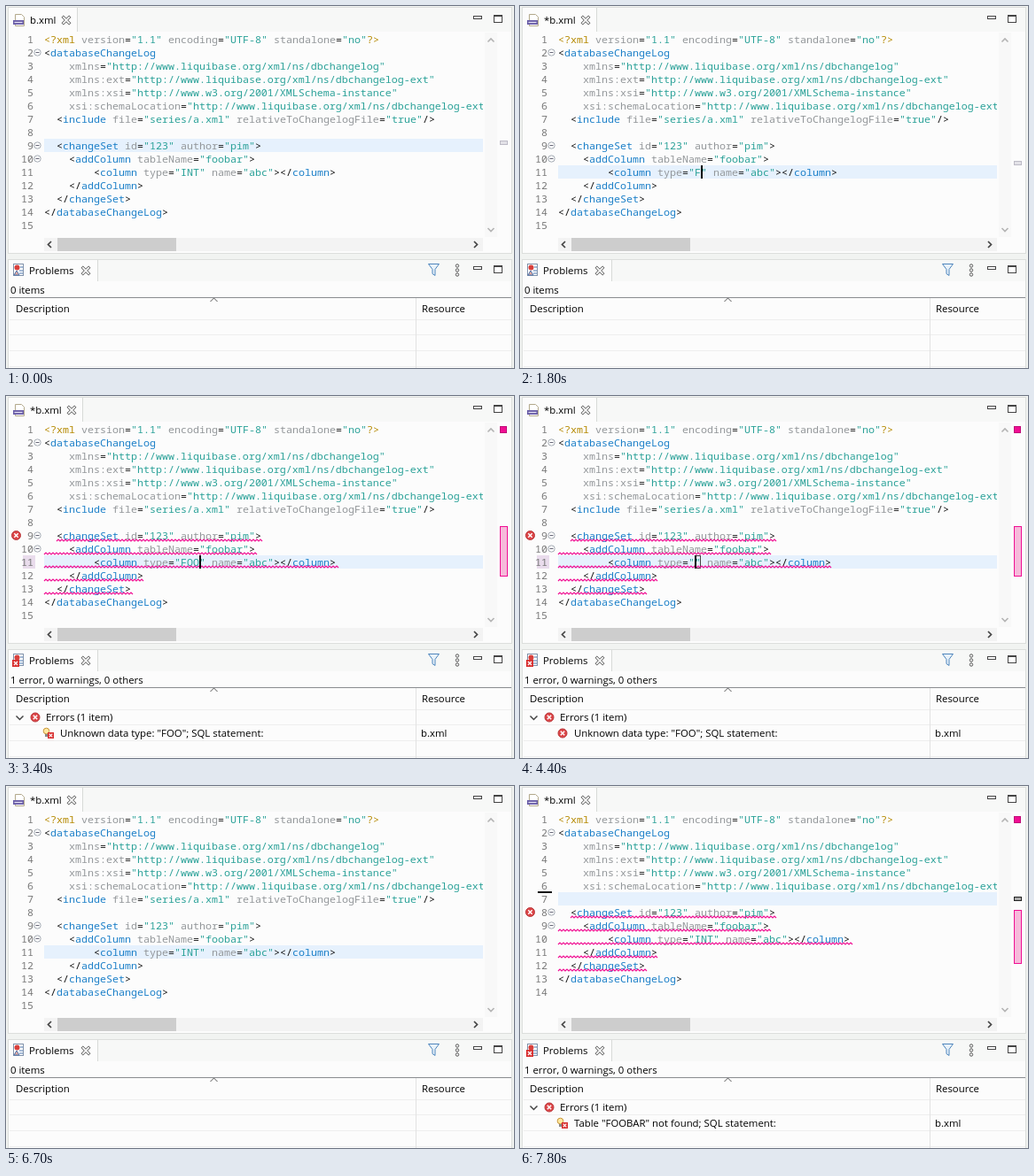
An HTML page that plays this animation: 573 by 409 pixels, repeating every 8 s.

```html
<!DOCTYPE html>
<html lang="en">
<head>
<meta charset="utf-8">
<title>XML changelog editor</title>
<style>
  html, body { margin: 0; width: 100%; height: 100%; overflow: hidden; }
  svg { display: block; width: 573px; height: 409px; }
  text { white-space: pre; }
  .code { font: 11.667px "Noto Sans Mono", monospace; }
  .ui { font: 11.4px "Open Sans", sans-serif; fill: #000; }
</style>
</head>
<body>
<svg id="stage" viewBox="0 0 573 409"></svg>
<script>
const LOOP = 8000, LEFT = 43, TOP = 30, CHAR = 7, ROW = 15, BASELINE = 12, VALUE_COL = 22;
const PINK = '#f00e93';

// Each step changes part of the editor state at a given time.
const steps = [
  [0, { line: 9, col: 0, caret: false, value: 'INT', selected: false, dirty: false,
        removed: false, invalid: false, problem: '', quickFix: false, ruler: 152 }],
  [500, { line: 11, col: 24, caret: true }],
  [700, { col: 25, selected: true }],
  [1200, { caret: false }],
  [1600, { caret: true }],
  [1800, { value: 'F', col: 23, selected: false, dirty: true, ruler: 175 }],
  [1900, { invalid: true, ruler: 0 }],
  [2000, { value: 'FO', col: 24 }],
  [2200, { value: 'FOO', col: 25 }],
  [2400, { problem: 'Unknown data type: "FOO"; SQL statement:' }],
  [2500, { quickFix: true }],
  [2900, { caret: false }],
  [3400, { caret: true }],
  [3500, { quickFix: false }],
  [3900, { caret: false }],
  [4400, { value: '', col: 22, caret: true }],
  [4900, { problem: 'Unknown data type: ; SQL statement:', quickFix: true }],
  [5000, { value: 'I', col: 23 }],
  [5100, { value: 'IN', col: 24 }],
  [5200, { value: 'INT', col: 25, invalid: false }],
  [5700, { caret: false }],
  [6100, { problem: '', quickFix: false }],
  [6200, { caret: true }],
  [6700, { caret: false }],
  [6800, { line: 7, col: 0, caret: true }],
  [7200, { removed: true, ruler: 125 }],
  [7300, { invalid: true }],
  [7700, { caret: false, problem: 'Table "FOOBAR" not found; SQL statement:' }],
  [7800, { quickFix: true }],
];

const rect = (x, y, w, h, fill, stroke = 'none') =>
  `<rect x="${x}" y="${y}" width="${w}" height="${h}" fill="${fill}" stroke="${stroke}"/>`;
const path = (d, stroke, width = 1, fill = 'none') =>
  `<path d="${d}" stroke="${stroke}" stroke-width="${width}" fill="${fill}"/>`;
const circle = (x, y, r, fill, stroke = 'none') =>
  `<circle cx="${x}" cy="${y}" r="${r}" fill="${fill}" stroke="${stroke}"/>`;
const escapeText = s => s.replace(/&/g, '&amp;').replace(/</g, '&lt;');
const label = (x, y, s) => `<text class="ui" x="${x}" y="${y}">${escapeText(s)}</text>`;
const rowTop = line => TOP + (line - 1) * ROW;
const codeText = (x, line, s, fill) =>
  `<text class="code" x="${x}" y="${rowTop(line) + BASELINE}" fill="${fill}">${escapeText(s)}</text>`;
const cross = (x, y, r, stroke, width) =>
  path(`M${x - r} ${y - r}l${2 * r} ${2 * r}m0 ${-2 * r}l${-2 * r} ${2 * r}`, stroke, width);
const errorIcon = (x, y) => circle(x, y, 5, '#dc4446', '#b9393c') + cross(x, y, 2.2, '#fff', 1.5);
const closeButton = (x, y) => cross(x, y, 4.3, '#555', 3.2) + cross(x, y, 3.8, '#fcfcfc', 1.7);

function windowButtons(y) {
  return rect(527.5, y - 2.5, 9, 3, '#fff', '#444') + rect(550.5, y - 3.5, 9, 8, '#fff', '#444') +
    path(`M550 ${y - 2.5}h10`, '#444');
}

function changelog({ value, removed }) {
  const site = 'http://www.liquibase.org/xml/ns/dbchangelog';
  const lines = [
    '<?xml version="1.1" encoding="UTF-8" standalone="no"?>',
    '<databaseChangeLog',
    `    xmlns="${site}"`,
    `    xmlns:ext="${site}-ext"`,
    '    xmlns:xsi="http://www.w3.org/2001/XMLSchema-instance"',
    `    xsi:schemaLocation="${site}-ext`,
    '  <include file="series/a.xml" relativeToChangelogFile="true"/>',
    '',
    '  <changeSet id="123" author="pim">',
    '    <addColumn tableName="foobar">',
    `        <column type="${value}" name="abc"></column>`,
    '    </addColumn>',
    '  </changeSet>',
    '</databaseChangeLog>',
    '',
  ];
  if (removed) lines.splice(6, 1);
  return lines;
}

function tokenColor(token, before) {
  if (token[0] === '"') return '#2aa198';
  if (/\?/.test(token)) return '#b58900';
  if (!/\w/.test(token)) return '#111';
  return /[<\/]$/.test(before) ? '#1b7fc8' : '#93979a';
}

function codeLine(source, line) {
  const tokens = source.matchAll(/"[^"]*"?|<\?xml|\?>|<\/?|[\w:]+|[^"\w<?\s]+/g);
  return [...tokens].map(t => codeText(LEFT + t.index * CHAR, line, t[0],
    tokenColor(t[0], source.slice(0, t.index)))).join('');
}

function squiggle(from, to, y) {
  let d = `M${from} ${y}`;
  for (let x = from; x < to; x += 4) d += 'l2 -2l2 2';
  return path(d, PINK, 1.2);
}

function editor(s) {
  const lines = changelog(s);
  const first = s.removed ? 8 : 9;
  let out = rect(2.5, 1.5, 568, 278, '#fcfcfc', '#dcdedc') + rect(3, 2, 567, 27, '#f7f8f7');

  // Tab
  const tabEnd = s.dirty ? 86.5 : 80.5;
  out += rect(3, 2, tabEnd - 3, 28, '#fcfcfc') + path(`M${tabEnd} 2v27`, '#d8dad8') +
    path('M10.5 9.5h7l3 3v10h-10z', '#b3a98c', 1, '#fff') + rect(8, 16, 12, 5, '#6b5fa8') +
    path('M9.5 18.5h9', '#e4e0f4', 1.2) +
    label(27, 20, s.dirty ? '*b.xml' : 'b.xml') + closeButton(s.dirty ? 74 : 68, 16) +
    windowButtons(14);

  // Scroll bars
  out += rect(540, 30, 14, 231, '#f8f8f8') +
    path('M543.5 40.5l3.5 -3.5l3.5 3.5M543.5 251l3.5 3.5l3.5 -3.5', '#b4b4b4', 1.6) +
    rect(43, 262, 495, 15, '#f3f3f3') + rect(58, 262, 134, 15, '#cdcdcd') +
    path('M51 266l-3.5 3.5l3.5 3.5M528 266l3.5 3.5l-3.5 3.5', '#444', 1.7);

  // Current line and line numbers
  out += rect(LEFT, rowTop(s.line), 495, ROW, '#e6f1fd');
  if (s.invalid && s.value !== 'INT') out += rect(19, rowTop(11), 14, ROW, '#e9dcec');
  lines.forEach((_, i) => {
    const number = String(i + 1);
    out += codeText(31 - number.length * CHAR, i + 1, number, '#787878');
  });
  if (s.removed) out += rect(20, 119, 16, 2, '#111');
  for (const line of [2, first, first + 1]) {
    const y = rowTop(line) + 7.5;
    out += circle(35.5, y, 3.7, '#fff', '#a3aab2') + path(`M33.5 ${y}h4`, '#667');
  }

  // Code
  const valueX = LEFT + VALUE_COL * CHAR;
  if (s.selected) out += rect(valueX, rowTop(11), 3 * CHAR, ROW, '#0078d7');
  out += '<g clip-path="url(#codeArea)">' + lines.map((t, i) => codeLine(t, i + 1)).join('') + '</g>';
  if (s.selected) out += codeText(valueX, 11, s.value, '#fff');
  if (!s.value) out += rect(valueX + .5, rowTop(11) + .5, 6, ROW - 1, 'none', '#444');

  // Error markers
  if (s.invalid) {
    for (let line = first; line < first + 5; line++) {
      out += squiggle(line === first ? LEFT + 2 * CHAR : LEFT,
        LEFT + lines[line - 1].length * CHAR, rowTop(line) + 14);
    }
    out += errorIcon(11.5, rowTop(first) + 7.5) + rect(557.5, 34.5, 7, 7, PINK, '#c00c78') +
      rect(557.5, s.removed ? 140.5 : 147.5, 8, s.removed ? 60 : 56, '#f6b9da', PINK);
  }
  if (s.ruler) {
    out += rect(557.5, s.ruler + .5, 8, 4, s.removed ? '#aaa' : '#e2e1e7', s.removed ? '#222' : '#bdbbc6');
  }
  if (s.caret) out += rect(LEFT + s.col * CHAR, rowTop(s.line), 2, ROW, '#000');
  return out;
}

function problems(s) {
  let out = rect(2.5, 286.5, 568, 125, '#fcfcfc', '#dcdedc') + rect(3, 287, 567, 24, '#f7f8f7') +
    rect(3, 287, 100, 26, '#fcfcfc') + path('M103.5 287v24', '#d8dad8');

  // View icon and toolbar
  out += rect(8.5, 291.5, 11, 13, '#fff', '#8192aa') + circle(12.5, 295.5, 3, '#d8403c') +
    path('M16 295h3M15 299h4M15 302h4', '#4f78b0', 1.2);
  out += s.problem ? rect(7, 298, 8, 8, '#d83030') + cross(11, 302, 2, '#fff', 1.4)
                   : path('M9 304l3 -5l3 5z', '#4f78b0', 1, '#e0a8a0');
  out += label(26, 303, 'Problems') + closeButton(90, 299) + windowButtons(297) +
    path('M476.5 291.5h12l-4.5 6v7l-3 -2v-5z', '#4f86bd', 1, '#e8f2fa') +
    [293.5, 298.5, 303.5].map(y => circle(509, y, 1.7, '#fff', '#555')).join('');

  // Table
  out += label(5, 325, s.problem ? '1 error, 0 warnings, 0 others' : '0 items') +
    path('M4 329.5h566', '#8a8c90') +
    path('M4 354.5h566M4 371.5h566M4 389.5h566M4 407.5h566', '#eeeeee') +
    path('M462.5 330v79', '#e2e2e2') + path('M230.5 334l4 -4l4 4', '#555', 1) +
    label(11, 346, 'Description') + label(469, 346, 'Resource');
  if (s.problem) {
    out += path('M11.5 361.5l4 4l4 -4', '#444', 1.5) + errorIcon(33, 363) +
      label(45, 367, 'Errors (1 item)') + label(61, 385, s.problem) + label(468, 385, 'b.xml');
    out += s.quickFix
      ? circle(45.5, 378.5, 3.3, '#ffe9a0', '#c9963a') + rect(44, 382, 3, 3, '#888') +
        rect(47, 380, 7, 7, '#d83030') + cross(50.5, 383.5, 1.8, '#fff', 1.2)
      : errorIcon(48, 381);
  }
  return out;
}

const stage = document.getElementById('stage');
const clip = `<clipPath id="codeArea">${rect(LEFT, TOP, 495, 231, '#000')}</clipPath>`;
let shown = -1;

function draw() {
  const time = performance.now() % LOOP;
  const reached = steps.filter(([start]) => start <= time);
  if (reached.length !== shown) {
    shown = reached.length;
    const state = Object.assign({}, ...reached.map(([, change]) => change));
    stage.innerHTML = clip + rect(0, 0, 573, 409, '#f1f3f1') + editor(state) + problems(state);
  }
  requestAnimationFrame(draw);
}
draw();
</script>
</body>
</html>
```
